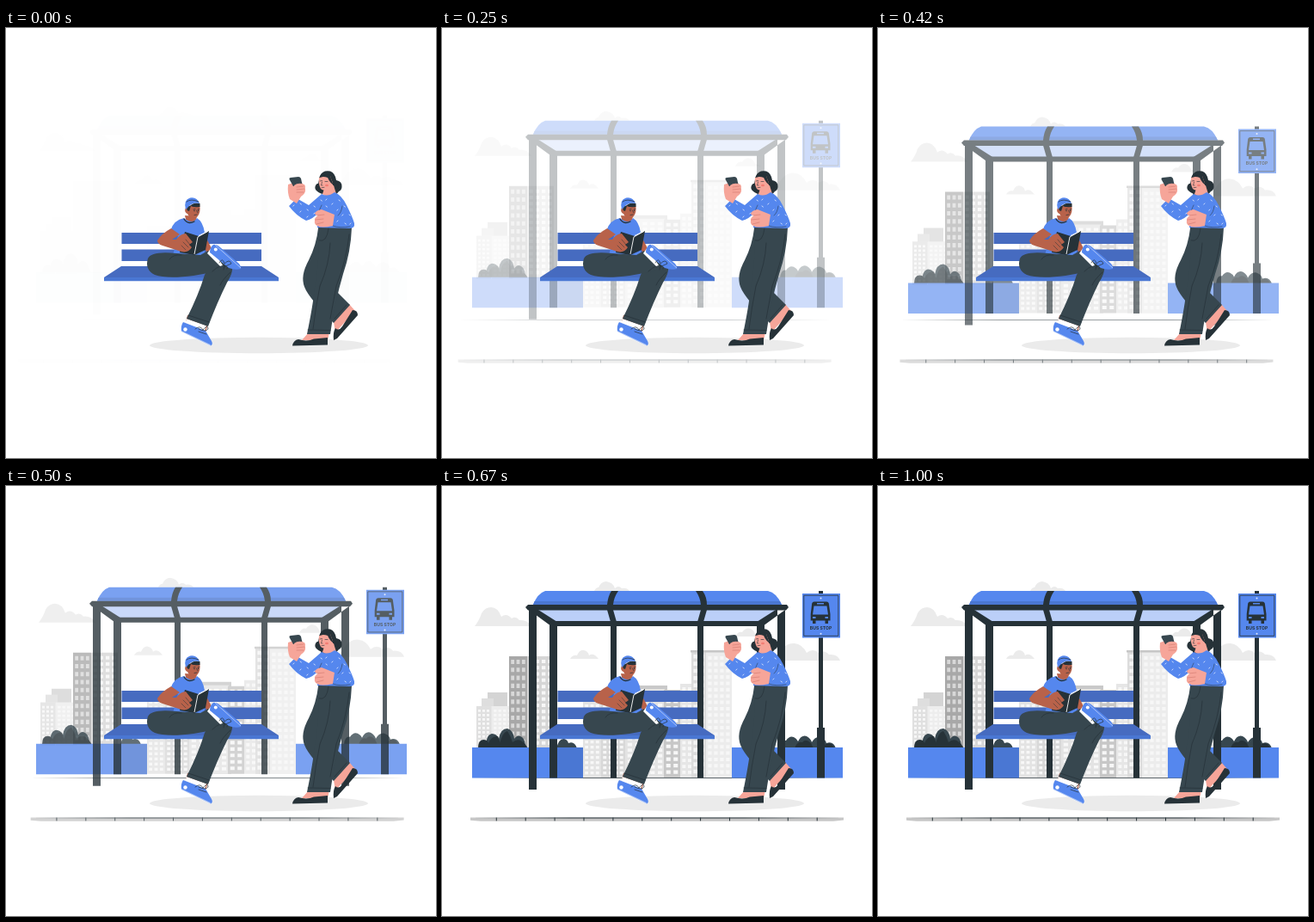
An HTML page for the animation above (1040 ms loop, 500 px wide and 500 px high).

```html
<!DOCTYPE html>
<html lang="en">
<head>
<meta charset="utf-8">
<title>Bus stop</title>
<style>
html, body { margin: 0; width: 100%; height: 100%; overflow: hidden; background: #fff; }
svg { display: block; width: 100vw; height: 100vh; }
.blue { fill: #5587ee; }
.deep { fill: #4a77d3; }
.bench { fill: #466bc0; }
.dark { fill: #263238; }
.slate { fill: #37474f; }
.tan { fill: #b8624a; }
.pink { fill: #f6a599; }
.line { fill: none; stroke: #263238; stroke-width: .7; stroke-linecap: round; stroke-linejoin: round; }
.cloud { fill: #ebebeb; }
text { font: 700 5.1px Inter, "Open Sans", sans-serif; text-anchor: middle; fill: #263238; }
</style>
</head>
<body>
<svg viewBox="0 0 500 500">
  <g class="drop cloud">
    <path d="M38 163Q43 157 46 148Q50 141 57 141Q65 141 69 152Q75 147 81 154Q86 151 90 156Q99 155 104 163Z"/>
    <path d="M177 122Q179 118 182 118Q185 111 191 111Q199 112 201 119Q205 115 209 119Q215 118 218 122Z"/>
    <path d="M149 201Q152 196 157 197Q160 190 165 191Q170 192 171 197Q176 193 182 201Z"/>
    <path d="M341 175Q344 169 349 170Q353 164 359 166Q363 168 364 172L372 175Z"/>
    <path d="M383 203Q390 198 394 191Q401 182 410 183Q419 184 424 194Q431 188 438 194Q445 190 450 196Q460 195 463 203Z"/>
  </g>
  <g class="drop" id="city"></g>

  <g class="slide">
    <path d="M33 339.3L150 338.9H350L468 339.3L350 339.7H150Z" class="dark"/>
    <path d="M33 385.6H467V388.5L455 389.8H45L33 388.8Z" fill="#c7c7c7"/>
    <path d="M33 386L150 385.4H350L467 386L350 386.4H150Z" class="dark"/>
    <path id="ticks" class="line" style="stroke-width:1"/>
  </g>

  <g class="drop">
    <g class="slate">
      <path d="M52 305Q50 290 58 288Q64 288 66 294Q68 282 76 282Q83 284 84 294Q88 288 93 292Q97 295 97 305Z"/>
      <path d="M133 305Q136 293 142 294Q146 295 147 299Q154 296 157 305Z"/>
      <path d="M393 305Q394 295 400 296Q404 290 409 292Q413 294 414 297Q418 289 424 291Q429 294 430 298Q434 291 440 292Q446 294 447 299Q455 296 458 305Z"/>
    </g>
    <g class="dark">
      <path d="M42 305Q42 295 48 295Q53 295 54 299Q58 290 65 291L70 305Z"/>
      <path d="M66 305Q69 287 76 285Q80 291 82 298Q91 290 100 305Z"/>
      <path d="M410 305Q413 296 419 298Q423 293 429 299L432 305ZM442 305Q446 297 453 300L457 305Z"/>
    </g>
    <path class="blue" d="M35 304H125V339.5H35ZM337 304H466V339.5H337Z"/>
    <path class="deep" d="M125 304H164V339.5H125Z"/>
  </g>

  <g class="drop">
    <path d="M110 143H391L373 159H128Z" fill="#5587ee" opacity=".4"/>
    <path class="blue" d="M106 138Q111 125 120 122H379Q389 124 395 138Z"/>
    <path class="deep" d="M107.500 134H393L395 138H106Z"/>
    <g class="dark">
      <path d="M125 157H375V163H125ZM125 160H134V339.500H125ZM366 160H375V339.500H366ZM196 158H203V339.500H196ZM297 158H304V339.500H297Z"/>
      <path d="M101 143H110V353H101ZM390 143H399V353H390ZM101 144H112L134 158V163H127ZM399 144H388L366 158V163H373Z"/>
      <path d="M197 122H205Q200 129 199 138V144L203 158V163H196V158L192 144V138Q193 128 197 122ZM295 122H303Q308 129 308 138V144L304 158V163H297V158L301 144V138Q300 129 295 122Z"/>
      <path d="M100 138H401L403 141L400 144.500H100L97 141Z"/>
    </g>
  </g>

  <g class="drop">
    <path class="dark" d="M438 122H443V281H445V339.500H436V281H438Z"/>
    <path class="blue" d="M419 125H463V176.500H419Z"/>
    <path class="line" d="M421.200 127.200H460.800V174.300H421.200Z" style="stroke-width:.8"/>
    <path class="dark" d="M433 134.500H447Q450 134.500 450 138L451.500 149V156.500H449V160H445.500V156.500H434.500V160H431V156.500H428.700V149L430 138Q430 134.500 433 134.500Z"/>
    <path class="blue" d="M432.500 139.500H447.500L449 149.500H431ZM436 136H444V137.500H436ZM431 152H434.500V154H431ZM445.500 152H449V154H445.500Z"/>
    <circle cx="440.500" cy="130.500" r="1" fill="#dfe8fc"/><circle cx="440.500" cy="171.800" r="1" fill="#dfe8fc"/>
    <text x="440.500" y="167">BUS STOP</text>
  </g>

  <ellipse cx="294" cy="369" rx="127" ry="9.300" fill="#ebebeb"/>

  <g>
    <path class="bench" d="M134.500 238H297V251H134.500ZM134.500 257.500H297V271H134.500ZM134 277H297L317 290H114Z"/>
    <path class="deep" d="M114 290H317V294.300H114Z"/>
  </g>

  <!-- reader -->
  <g>
    <path class="tan" d="M211 334L235 343L232 354L208 346Z"/>
    <path fill="#fff" d="M210 338L233 346L231 353L208 345Z"/>
    <path class="slate" d="M238 276Q258 270 263 278Q264 285 257 296Q246 318 235 347L210 338Q224 310 231 287Z"/>
    <path class="line" d="M212 334L236 342M261 284Q252 292 249 299"/>
    <path class="blue" d="M206 342L232 352L239 364Q241 368 238 369.500L204 353Q203 346 206 342Z"/>
    <path fill="#fff" d="M204 352L238 368.300L237.500 369.800L204 354Z" opacity=".5"/>
    <circle cx="208.500" cy="350.500" r="2.200" fill="#fff"/>
    <path class="line" d="M220 350Q226 345 229 351Q235 344 235 350Q232 354 224 350M224 353L233 356"/>
    <path class="tan" d="M208 218L222 219L220 228L210 227ZM230 240Q235 248 240 258L234 262L227 248Z"/>
    <path class="blue" d="M207 221Q195 223 191 236L200 242L194 264H231L231 238Q229 225 222 221Q217 229 207 221Z"/>
    <path class="line" d="M207 222Q211 229 219 225" style="stroke-width:1.300"/>
    <path class="tan" d="M210 207L225 205Q227 215 222 220Q214 223 211 216Q207 214 208.500 210Z"/>
    <path class="dark" d="M214 207Q218 202 225.500 204L225.500 208Q218 209 215 207L213 213L210.500 212V207Z"/>
    <path class="blue" d="M209 211Q206 200 214 197.500Q222 196 225 204Q217 202 212 208Z"/>
    <path class="line" d="M210 202Q215 198 224 202M218 211L220 210.500M223 211L224.500 210.500M219 217.500L222 217M221.500 212L223 215"/>
    <circle class="dark" cx="219" cy="212.500" r=".7"/><circle class="dark" cx="223.700" cy="212.300" r=".7"/>
    <path class="slate" d="M198 262Q169 259 165 268Q161 281 173 287Q187 292 218 288L246 283L259 276L235 259L226 264Z"/>
    <path class="line" d="M190 269Q194 263 204 264M240 283Q249 274 261 275M255 273L253 281M259 273L257 280"/>
    <path class="dark" d="M208 237L224 242L236 236L232 258L219 264L202 261Z"/>
    <path d="M224 241.500L234.500 236.500L223 243L219 263" fill="none" stroke="#fff" stroke-width=".9"/>
    <path class="tan" d="M192 233Q181 239 176 247Q176 251 182 253L204 260Q212 262 216 255L213 252L217 249L209 239Q203 239 198 246L193 246L202 240Z"/>
    <path class="line" d="M209 246L214 252M206 249L212 255M204 253L209 258" style="stroke-width:.5"/>
    <path fill="#fff" d="M239 255L252 276L249 277L234 262Z"/>
    <path class="blue" d="M241 252Q244 251 249 255L271 274Q274 278 273 280Q267 282 259 279L237 261Q237 255 241 252Z"/>
    <path d="M243 252L273 279" stroke="#a9c1f7" stroke-width="1" fill="none"/>
    <circle cx="243.800" cy="257.500" r="2" fill="#fff"/>
    <path class="line" d="M248 273Q252 266 254 274Q260 268 262 274L253 278"/>
  </g>

  <!-- walker -->
  <g>
    <path class="pink" d="M381 342L399 321L406 329L383 354Z"/>
    <path class="dark" d="M381 363Q380 354 383 349Q387 353 391 347L403 328Q409 328 409 334L385 361Z"/>
    <path class="slate" d="M363 233Q361 252 352 270Q342 288 347 301Q352 314 381 343L400 322L382 304L388 240Z"/>
    <path class="pink" d="M352 354H376L374 363H344Z"/>
    <path class="dark" d="M333 369.500Q334 363 340 362Q350 365 358 361.500L374 360V368.500Z"/>
    <path class="slate" d="M363 232H402Q401 260 392 286Q382 320 377 356H350Q357 322 359 302Q365 272 363 232Z"/>
    <path class="line" d="M364 247Q373 250 375 233M377 250Q376 275 365 300Q360 325 357 350M351 351L377 351.500M382 338L396 322M399 240Q396 270 384 300L377 338"/>
    <path class="dark" d="M365 172Q368 165 377 166.500Q383 169 384 177Q391 178 390.500 185Q390 189 387 190Q383 196 378 192Q367 195 362 190Q358 187 360 183Q362 180 363 181Z"/>
    <path class="pink" d="M371 184L381 183L384 193L374 197L368 193Z"/>
    <path class="blue" d="M367 193Q374 197 382 191Q390 194 396 206Q403 220 405 227Q406 233 399 233L362 232L363 215Q357 222 349 224Q337 218 329 207L338 198L352 206Z"/>
    <path class="pink" d="M364 174Q370 172 377 172Q379 178 380 180Q381 186 375 188Q369 190 366 187Q363 182 364 174Z"/>
    <path class="dark" d="M364 174Q368 168 377 171Q379 180 382 183Q377 181 374 174Q369 172 364 174Z"/>
    <path class="line" d="M365 178L367.500 177.500M371 178.500L374 178.500M367.500 179L366.500 183L368 183M367 185.700L370 185.300" style="stroke-width:.6"/>
    <ellipse cx="373" cy="183" rx="2" ry="1.200" fill="#f27d74"/>
    <path id="specks" fill="none" stroke="#dbe5fd" stroke-width=".9" stroke-linecap="round"/>
    <path class="line" d="M363 215L367 206M386 218Q390 215 391 207M380 230Q388 233 400 231" style="stroke-width:.5"/>
    <path class="pink" d="M328 182Q327 192 330 199L338 204L343 196Q349 192 348 187L344 180L334 180Z"/>
    <path class="slate" d="M329.500 176Q329 174 331 174L340 173Q342 173 343 175L344.500 182L334 184Z"/>
    <path class="pink" d="M335 183Q340 179 347 182Q349 185 347 187Q349 190 346 192L336 194Z"/>
    <path class="line" d="M338 185L346 184M338 188L347 187M338 191L346 191" style="stroke:#c96e65;stroke-width:.5"/>
    <path class="pink" d="M382 217L367 211Q360 212 359 216Q360 218 363 218Q358 221 359 224Q358 228 362 230Q366 233 380 230Z"/>
    <path class="line" d="M361 218L370 217M360 223L369 222M361 228L369 226" style="stroke:#c96e65;stroke-width:.5"/>
  </g>
</svg>
<script>
const $ = id => document.getElementById(id);

// x, y, width, height, wall, window columns, rows
const towers = [
  [53, 240, 23, 64, '#d4d4d4', 0, 0],
  [46, 247, 14, 57, '#dedede', 0, 0],
  [40, 256, 42, 48, '#e6e6e6', 0, 0],
  [40, 256, 17, 50, '#e0e0e0', 3, 9],
  [58, 256, 24, 50, '#ededed', 4, 9],
  [78, 198, 21, 107, '#a8a8a8', 3, 11],
  [99, 198, 31, 107, '#d6d6d6', 4, 14],
  [222, 232, 40, 107, '#c9c9c9', 0, 0],
  [164, 250, 21, 89, '#e3e3e3', 3, 14],
  [185, 250, 28, 89, '#d8d8d8', 4, 14],
  [213, 236, 46, 103, '#e3e3e3', 5, 15],
  [258, 237, 19, 102, '#c7c7c7', 2, 13],
  [277, 230, 22, 109, '#e6e6e6', 3, 15],
  [290, 192, 47, 147, '#e8e8e8', 0, 0],
  [290, 192, 17, 147, '#dcdcdc', 2, 17],
  [307, 194, 30, 145, '#ececec', 4, 19],
  [289, 191, 41, 2.5, '#c7c7c7', 0, 0]
];

const box = (x, y, w, h) => `M${x} ${y}h${w}v${h}h${-w}z`;

function tower([x, y, w, h, wall, cols, rows]) {
  let panes = '';
  const dx = (w - 2) / cols, dy = (h - 5) / rows;
  for (let r = 0; r < rows; r++)
    for (let c = 0; c < cols; c++)
      panes += box(x + 1 + dx * (c + .2), y + 4 + dy * r, dx * .6, dy * .55);
  const glass = wall === '#a8a8a8' ? '#d8d8d8' : '#f7f7f7';
  return `<path d="${box(x, y, w, h)}" fill="${wall}"/><path d="${panes}" fill="${glass}"/>`;
}

$('city').innerHTML = towers.map(tower).join('');
$('ticks').setAttribute('d', Array.from({ length: 12 }, (_, i) => `M${63.3 + i * 33.9} 386v3`).join(''));

const specks = [[335, 206], [342, 204], [343, 213], [350, 211], [351, 219], [358, 207], [359, 215], [366, 200],
  [373, 199], [372, 207], [380, 204], [387, 200], [386, 211], [393, 207], [392, 217], [399, 217], [386, 224], [394, 227], [401, 227]];
$('specks').setAttribute('d', specks.map(([x, y], i) => `M${x} ${y}l${i % 2 ? 1.4 : -1.2} 1`).join(''));

const LOOP = 1040, FRAMES = 25, FPS = 24, TRAVEL = 20;

// cubic-bezier(.36, -.01, .5, 1.38)
const curve = (a, b, s) => 3 * a * s * (1 - s) ** 2 + 3 * b * s * s * (1 - s) + s ** 3;
function ease(x) {
  if (x >= 1) return 1;
  let lo = 0, hi = 1;
  for (let i = 0; i < 30; i++) {
    const mid = (lo + hi) / 2;
    if (curve(.36, .5, mid) < x) lo = mid; else hi = mid;
  }
  return curve(-.01, 1.38, lo);
}

const drops = document.querySelectorAll('.drop');
const slides = document.querySelectorAll('.slide');

function place(parts, x, y, alpha) {
  for (const part of parts) {
    part.setAttribute('transform', `translate(${x} ${y})`);
    part.setAttribute('opacity', alpha);
  }
}

// The motion runs in 24 steps a second.
function draw(now) {
  const step = Math.min(FRAMES - 1, Math.floor((now % LOOP + 5) * FPS / 1000));
  const p = ease((step + 1) / FRAMES);
  const shift = (p - 1) * TRAVEL;
  const alpha = Math.max(0, Math.min(1, p));
  place(drops, 0, shift, alpha);
  place(slides, shift, 0, alpha);
}

const start = performance.now();
function tick() {
  draw(performance.now() - start);
  requestAnimationFrame(tick);
}
tick();
</script>
</body>
</html>
```
